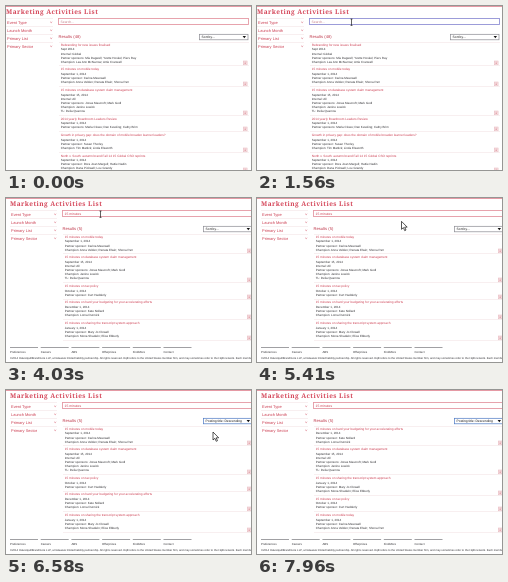
Recreate the animation shown at these times as an HTML page. Size 245 by 164 pixels, loop 8 s.

```html
<!DOCTYPE html>
<html lang="en">
<head>
<meta charset="utf-8">
<title>Marketing Activities List</title>
<style>
html, body { margin: 0; width: 100%; height: 100%; overflow: hidden; background: #fff; }
svg { display: block; width: 100vw; height: 100vh; }
text { font-family: "Liberation Sans", Arial, sans-serif; text-rendering: geometricPrecision; white-space: pre; }
.title { font: bold 6.5px "Noto Serif", Georgia, serif; letter-spacing: .45px; }
</style>
</head>
<body>
<svg id="stage" viewBox="0 0 245 164"></svg>
<script>
const LOOP = 8000, RED = '#cb3a4e', ROSE = '#e59aa5', FAINT = '#f4e4e6', INK = '#2e2e32', BLUE = '#9292d6';
const QUERY = '15 minutes';
const KEYS = [2020, 2120, 2300, 2480, 2570, 2660, 2840, 3020, 3210, 3390];
const SORTS = ['Sort by...', 'Posting title: Ascending', 'Posting title: Descending',
  'Event date: Ascending', 'Event date: Descending'];
const stage = document.getElementById('stage');

function add(parent, tag, attrs, content) {
  const el = document.createElementNS('http://www.w3.org/2000/svg', tag);
  for (const k in attrs) el.setAttribute(k, attrs[k]);
  if (content !== undefined) el.textContent = content;
  parent.appendChild(el);
  return el;
}
const group = parent => add(parent, 'g');
const rect = (p, x, y, width, height, fill, more) => add(p, 'rect', { x, y, width, height, fill, ...more });
const label = (p, x, y, size, fill, s, more) => add(p, 'text', { x, y, 'font-size': size, fill, ...more }, s);
const path = (p, d, fill, stroke, w) => add(p, 'path', { d, fill, stroke, 'stroke-width': w, 'stroke-linejoin': 'round' });
const show = (el, on) => el.setAttribute('display', on ? 'inline' : 'none');

// Result entries: heading, then detail lines
const mobile = ['15 minutes on mobile today', 'September 1, 2014', 'Partner sponsor: Carina Masowell',
  'Champion: Anna Velden; Renata Elwin; Shona Parr'];
const claims = ['15 minutes on database system claim management', 'September 15, 2014', 'Internal: All',
  'Partner sponsors: Jonas Maucroft; Mark Godl', 'Champion: Janine Lowick', 'TL: Delia Quarrow'];
const tax = ['15 minutes on tax policy', 'October 1, 2014', 'Partner sponsor: Curt Hadderly'];
const budget = ['15 minutes on hard your budgeting for your accelerating efforts', 'December 1, 2014',
  'Partner sponsor: Kate Nollard', 'Champion: Lorna Dunnick'];
const sharing = ['15 minutes on sharing the transcript system approach', 'January 1, 2014',
  'Partner sponsor: Mary Jo Clowell', 'Champion: Mona Shadwin; Elise Ebberly'];
const allItems = [
  ['Rebranding for new issues finalised', 'Sept 2014', 'Internal: Global',
    'Partner sponsors: Mia Dagwell; Yvette Hoskel; Piers Ray', 'Champion: Lea Ann McNarrow; Artie Cranwell'],
  mobile, claims,
  ['2014 yearly Boardroom Leaders Review', 'September 1, 2014',
    'Partner sponsors: Marla Clowe; Dan Kessling; Cathy Brim'],
  ['Growth in privacy gap: does the domain of mobile broaden learner leaders?', 'September 1, 2014',
    'Partner sponsor: Susan Thorley', 'Champion: Tim Mattick; Linda Elsworth'],
  ['North v. South: autumn brand Fall 14 15 Global CSO reprints', 'September 1, 2014',
    'Partner sponsor: Dora Joan Margell; Hattie Nadin', 'Champion: Dana Pickwell; Lou Grandy']
];

function results(parent, items) {
  let y = 38.8;
  for (const [head, ...lines] of items) {
    const end = Math.round(y + 4.3 + 4.1 * lines.length);
    label(parent, 54.7, y + 1, 3.15, RED, head);
    lines.forEach((s, i) => label(parent, 54.7, y + 5.6 + 4.1 * i, 3, INK, s));
    rect(parent, 53, end, 190, .6, FAINT);
    rect(parent, 237.3, end - 4, 3.8, 3.8, '#f8e6e8', { stroke: '#e5b5bb', 'stroke-width': .5 });
    path(parent, `M239.2 ${end - 3.4}v2m-1 -.8l1 1l1 -1`, 'none', '#d8808b', .5);
    y += 8.2 + 4.1 * lines.length;
  }
}

function footer(parent) {
  ['Preferences', 'Careers', 'ABS', 'Offerprices', 'FindMore', 'Contact'].forEach((s, i) => {
    rect(parent, 30.7 * i, 149, 28, .7, '#77777c');
    label(parent, 30.7 * i, 154.8, 2.9, INK, s);
  });
  label(parent, 0, 161, 2.75, INK, '©2014 HalverquillBrandmore LLP, a Delaware limited liability partnership. All rights reserved. ' +
    'HqB refers to the United States member firm, and may sometimes refer to the HqB network. Each member firm');
}

rect(stage, 0, 0, 245, 164, '#fff');
rect(stage, 0, 0, 245, 1, ROSE);
const page = group(stage);
label(page, 0, 8, 6.5, '#d5485b', 'Marketing Activities List', { class: 'title' });
['Event Type', 'Launch Month', 'Primary List', 'Primary Sector'].forEach((s, i) => {
  const y = 12 + 8 * i;
  rect(page, 0, y, 47, .6, FAINT);
  label(page, 1, y + 5.6, 3.95, RED, s);
  path(page, `M44.2 ${y + 3.8}l1 .9l1 -.9`, 'none', RED, .5);
});
const box = rect(page, 52.5, 12.5, 190, 6, '#fff', { 'stroke-width': .9 });
const query = label(page, 54.5, 17, 3.4, INK, '');
const caret = rect(page, 54, 14, .6, 3.4, '#555');
const count = label(page, 52.5, 32.3, 4.1, '#bd3346', '');
const select = rect(page, 193.5, 28.3, 48.5, 5.5, '#fff', { 'stroke-width': .7 });
const choice = label(page, 195.6, 32.2, 3.3, '#111', '');
path(page, 'M236.6 30.1h3.4l-1.7 2.2z', '#111', 'none', 0);
rect(page, 53, 36, 190, .6, FAINT);

const lists = [allItems, [mobile, claims, tax, budget, sharing], [budget, claims, sharing, tax, mobile]].map((items, i) => {
  const g = group(page);
  results(g, items);
  if (i) footer(g);
  return g;
});

const menu = group(page);
rect(menu, 192.5, 33.5, 48.5, 17, '#fff', { stroke: '#444', 'stroke-width': .6 });
const glow = rect(menu, 192.8, 33.5, 48, 3.4, '#2f6fd0');
const options = SORTS.map((s, i) => label(menu, 194, 36.2 + 3.4 * i, 3.2, '#111', s));

const pointer = group(stage);
const shapes = {
  beam: path(pointer, 'M-1 -3h2M0 -3v6.4M-1 3.4h2', 'none', '#222', .7),
  arrow: path(pointer, 'M0 0v8l1.9 -1.7l1.3 3l1.3 -.6l-1.3 -2.9h2.5z', '#fff', '#111', .7),
  hand: path(pointer, 'M2.7 6.5V1.3q.8 -1.4 1.6 0V4.4q.8 -.8 1.5 .1q.8 -.6 1.4 .3q1 -.4 1.4 .7V8.2L7.7 10.6H3.6L.6 7.2q.2 -1.5 2.1 -.7z', '#fff', '#111', .7)
};

// Movement advances in ticks of about 90 ms
function glide(t, start, ticks, from, to) {
  const p = Math.min(1, (Math.floor((t - start) / 89) + 1) / ticks);
  return from.map((v, i) => v + (to[i] - v) * p);
}

function pointerAt(t) {
  if (t < 370 || t >= 7960) return null;
  if (t >= 6850) return ['hand', ...(t < 7690 ? [204, 41] : glide(t, 7690, 4, [204, 41], [243, 57]))];
  if (t >= 6120) return ['arrow', 207, 42];
  if (t >= 6030) return ['arrow', 207, 37.5];
  const [x, y] = t < 5140 ? glide(t, 370, 9, [140, 57], [94.5, 16]) : glide(t, 5140, 9, [94.5, 16], [207, 32.5]);
  return [y < 19.5 ? 'beam' : 'arrow', x, y];
}

function render(t) {
  const view = t < 4030 ? 0 : t < 6670 ? 1 : 2;
  const focus = t >= 1090 && t < 4030;
  const typed = KEYS.filter(k => k <= t).length;
  page.setAttribute('transform', `translate(${view ? 4 : 0} 0)`);
  lists.forEach((g, i) => show(g, i === view));

  box.setAttribute('stroke', focus ? BLUE : ROSE);
  query.textContent = typed ? QUERY.slice(0, typed) : 'Search...';
  query.setAttribute('fill', typed ? (focus ? '#55558f' : RED) : '#c5808a');
  show(caret, focus && (t < 1560 || typed));
  if (focus) caret.setAttribute('x', 54 + (typed ? query.getComputedTextLength() + .6 : 0));
  count.textContent = view ? 'Results (5)' : 'Results (48)';

  const sorted = t >= 6580;
  choice.textContent = SORTS[sorted ? 2 : 0];
  select.setAttribute('stroke', t >= 5850 ? '#4c78c4' : '#8b8b92');
  show(menu, t >= 5850 && !sorted);
  const row = t < 6030 ? 0 : t < 6120 ? 1 : 2;
  glow.setAttribute('y', 33.6 + 3.4 * row);
  options.forEach((o, i) => o.setAttribute('fill', i === row ? '#fff' : '#111'));

  const at = pointerAt(t);
  show(pointer, at);
  if (at) {
    pointer.setAttribute('transform', `translate(${at[1]} ${at[2]})`);
    for (const name in shapes) show(shapes[name], name === at[0]);
  }
}

const began = performance.now();
function tick() {
  render((performance.now() - began) % LOOP);
  requestAnimationFrame(tick);
}
tick();
</script>
</body>
</html>
```
